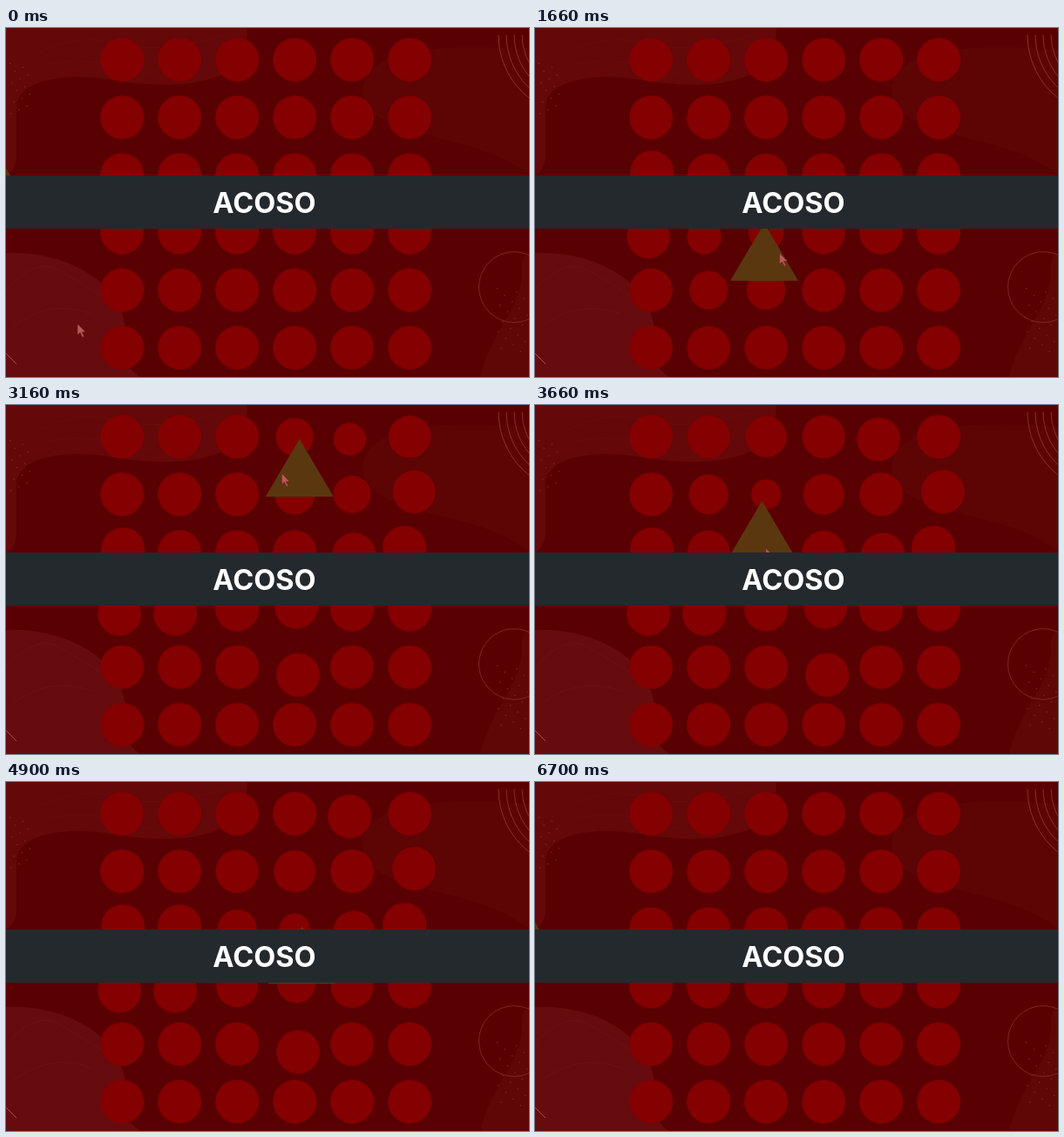
Animation, 600 px wide and 400 px high, one loop 7400 ms. Source, as an HTML page with a canvas:

```html
<!DOCTYPE html>
<html lang="es">
<head>
<meta charset="utf-8">
<title>Acoso</title>
<style>
html, body { margin: 0; width: 100%; height: 100%; overflow: hidden; background: #590002; }
canvas { display: block; }
</style>
</head>
<body>
<canvas id="stage" width="600" height="400"></canvas>
<script>
const ctx = document.getElementById('stage').getContext('2d');
const LOOP = 7400, RESET = 6400, LAG = 150, LEAD = 80, REACH = 75;

// Turning points of the dragged triangle: time, centre x, base y
const path = [
  [460, -14, 203], [1100, 138, 270], [2230, 379, 282], [2700, 432, 185],
  [2950, 394, 94], [3160, 337, 105], [3500, 262, 140], [3950, 268, 245],
  [4230, 213, 266], [4500, 240, 205], [4850, 340, 225], [5200, 275, 275],
  [5500, 200, 255], [5800, 125, 225], [6250, 18, 214]
];

// Where a touched dot comes to rest, by column and row
const knocks = {
  '0,2': [1, -3], '1,2': [0, -3], '0,3': [-3, 5], '1,3': [-5, 5], '3,3': [2, -3],
  '3,4': [4, 9], '5,2': [-6, -5], '5,1': [5, -3], '4,2': [2, 3], '4,0': [-3, 3]
};

const mix = (a, b, u) => a + (b - a) * u;
const clamp = u => Math.max(0, Math.min(1, u));
const smooth = u => (u = clamp(u), u * u * (3 - 2 * u));

function slope(k, axis) {
  const a = path[k - 1], b = path[k + 1];
  return a && b ? (b[axis] - a[axis]) / (b[0] - a[0]) : 0;
}

// Middle of the triangle at time t
function triangleAt(t) {
  if (t >= RESET) t = 0;
  const last = path.length - 1;
  let k = 0;
  while (k < last - 1 && t > path[k + 1][0]) k++;
  const a = path[k], b = path[k + 1], span = b[0] - a[0];
  const u = clamp((t - a[0]) / span), v = 1 - u;
  const at = axis => mix(a[axis], b[axis], smooth(u))
    + span * u * v * (slope(k, axis) * v - slope(k + 1, axis) * u);
  return { x: at(1), y: at(2) - 33 };
}

function cursorAt(t) {
  if (t < 460) {
    const u = Math.max(0, t - 15) / 155;
    return u < 1.6 ? { x: mix(82, 36, u), y: mix(339, 242, u) } : null;
  }
  if (t < RESET) return triangleAt(Math.min(t + LEAD, RESET - 1));
  if (t < 6595 || t >= 6695) return null;
  const u = (t - 6600) / 60;
  return { x: mix(284, 49, u), y: mix(232, 387, u) };
}

const distance = (dot, p) => Math.hypot(dot.x - p.x, dot.y - p.y);

const dots = Array.from({ length: 36 }, (_, n) => {
  const col = n % 6, row = Math.floor(n / 6);
  const [dx, dy] = knocks[[col, row]] || [0, 0];
  const dot = { x: 133.2 + 66 * col, y: 36.4 + 66 * row, dx, dy, touched: 0 };
  while (dot.touched < RESET && distance(dot, triangleAt(dot.touched)) > REACH) dot.touched += 10;
  return dot;
});

function fill(color, d) {
  ctx.fillStyle = color;
  ctx.fill(new Path2D(d));
}

function stroke(color, d, width = 1) {
  ctx.strokeStyle = color;
  ctx.lineWidth = width;
  ctx.stroke(new Path2D(d));
}

function arc(x, y, r, from = 0, to = 2 * Math.PI) {
  ctx.beginPath();
  ctx.arc(x, y, r, from, to);
}

function speckles(x, y, w, h, count) {
  ctx.fillStyle = '#7d2a26';
  for (let k = 0; k < count; k++) {
    ctx.fillRect(x + (k * 0.618 % 1) * w, y + k / count * h, 1.3, 1.3);
  }
}

function drawBackground() {
  ctx.fillStyle = '#590002';
  ctx.fillRect(0, 0, 600, 400);
  fill('#640809', 'M0 0H277C277 25 268 46 244 55C205 70 160 66 118 59C75 52 12 56 12 92V150Q10 164 0 169Z');
  fill('#5d0405', 'M600 25C540 20 480 20 440 35C412 46 402 70 414 88C440 130 540 120 600 168Z');
  fill('#5f0607', 'M600 258Q590 262 592 280C592 320 555 350 544 400H600Z');
  fill('#660b0e', 'M0 258C55 255 105 278 126 312Q142 340 134 362Q132 385 154 400H0Z');
  stroke('#6b1012', 'M35 30Q80 5 130 18T250 8M45 42Q95 30 170 54', .6);
  stroke('#711719', 'M0 300Q35 262 62 278T118 312M8 342Q50 310 100 328', .6);
  stroke('#a04e49', 'M0 373L12 385');
  ctx.strokeStyle = '#83322d';
  for (let r = 92; r >= 65; r -= 9) {
    arc(657, 8, r, Math.PI / 2, Math.PI);
    ctx.stroke();
  }
  ctx.strokeStyle = '#7d2825';
  arc(583, 297, 40.5);
  ctx.stroke();
  speckles(4, 40, 24, 62, 14);
  speckles(563, 298, 36, 76, 20);
}

function drawDots(t) {
  const live = t < RESET ? t : 0;
  const wake = triangleAt(live - LAG);
  ctx.fillStyle = '#840001';
  for (const dot of dots) {
    const u = smooth((live - dot.touched) / 400);
    const near = distance(dot, wake) / 55;
    arc(dot.x + dot.dx * u, dot.y + dot.dy * u, 25 - 8 * Math.exp(-near * near));
    ctx.fill();
  }
}

function drawTriangle(t) {
  const { x, y } = triangleAt(t);
  fill('#5b3710', `M${x} ${y - 33}l39 66h-78Z`);
}

function drawCursor(t) {
  const p = cursorAt(t);
  if (!p) return;
  const arrow = `M${p.x} ${p.y}v13l3 -3 2.6 5.4 2 -1 -2.4 -5h4Z`;
  fill('#b65a5a', arrow);
  stroke('#6d1718', arrow, .6);
}

function drawBanner() {
  ctx.fillStyle = '#24292d';
  ctx.fillRect(0, 169, 600, 61);
  ctx.fillStyle = '#fff';
  ctx.textAlign = 'center';
  ctx.font = '700 32.5px Inter, "Liberation Sans", sans-serif';
  ctx.fillText('ACOSO', 296.5, 211.5);
}

function frame(now) {
  const t = now % LOOP;
  drawBackground();
  drawDots(t);
  drawTriangle(t);
  drawCursor(t);
  drawBanner();
  requestAnimationFrame(frame);
}
requestAnimationFrame(frame);
</script>
</body>
</html>
```
